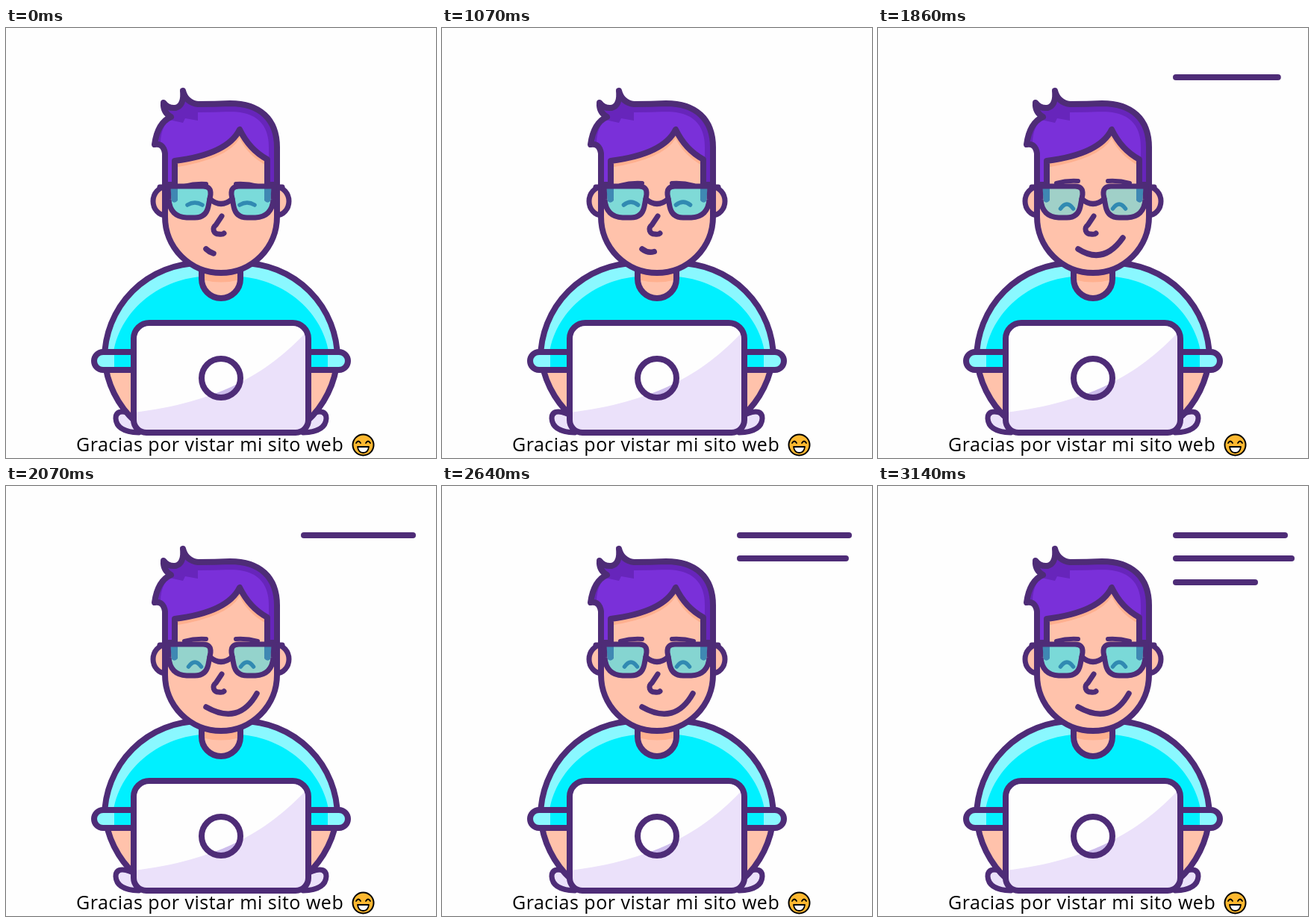
An HTML page with a canvas for the animation above (3570 ms loop, 576 px wide and 576 px high).

```html
<!DOCTYPE html>
<html lang="es">
<head>
<meta charset="utf-8">
<style>
html, body { margin: 0; width: 100%; height: 100%; overflow: hidden; background: #fefefe; }
canvas { display: block; width: 576px; height: 576px; }
</style>
</head>
<body>
<canvas id="stage" width="576" height="576"></canvas>
<script>
const ctx = document.getElementById('stage').getContext('2d');
const LOOP = 3570, STEP = 71.4;
const INK = '#4e2c77', SKIN = '#ffc2ab', SHADE = '#ffb08f', HAIR = '#7a30d9', HAIR_DARK = '#6725bb';
const CYAN = '#00f0ff', PALE = '#8af8ff', LILAC = '#ebe1fa', EYE = '#318ab2';

const clamp = v => Math.max(0, Math.min(1, v));
const mix = (a, b, k) => a + (b - a) * k;

// Interpolates rows of [tick, ...values].
function keyed(tick, rows) {
  let i = 0;
  while (i < rows.length - 2 && tick > rows[i + 1][0]) i++;
  const [a, b] = [rows[i], rows[i + 1]];
  const k = clamp((tick - a[0]) / (b[0] - a[0]));
  return a.slice(1).map((v, j) => mix(v, b[j + 1], k));
}

function shape(d, fill, stroke, width = 8) {
  const path = typeof d === 'string' ? new Path2D(d) : d;
  if (fill) { ctx.fillStyle = fill; ctx.fill(path); }
  if (stroke) { ctx.strokeStyle = stroke; ctx.lineWidth = width; ctx.stroke(path); }
}

function disc(x, y, r, fill, stroke, width) {
  const p = new Path2D();
  p.arc(x, y, r, 0, Math.PI * 2);
  shape(p, fill, stroke, width);
}

function clipped(path, draw) {
  ctx.save();
  ctx.clip(path);
  draw();
  ctx.restore();
}

function bothSides(draw) {
  draw();
  ctx.save();
  ctx.transform(-1, 0, 0, 1, 576, 0);
  draw();
  ctx.restore();
}

const ROWS = [66, 97, 129];
const FADE = [null, '#c9c9cd', '#89809a', INK];

function bar(y, right, color) {
  if (right > 396) shape(`M399 ${y} H${Math.max(399.1, right - 4)}`, null, color);
}

function drawLines(tick, ms) {
  const level = keyed(tick, [[0, 0], [3, 3], [4, 3], [7, 0], [8, 0], [11, 3], [12, 3], [15, 0]])[0];
  const color = FADE[Math.round(level)];
  if (color) [434, 411, 415].forEach((right, i) => bar(ROWS[i], right, color));
  const typed = [[1330, 0.275, 549], [2147, 0.303, 558], [2760, 0.3, 509]];
  typed.forEach(([start, speed, end], i) =>
    bar(ROWS[i], Math.min(end, 395 + Math.max(0, ms - start) * speed), INK));
}

function drawBody(tick) {
  const phase = clamp((tick - 13) / 31) * 9;
  const lift = -4 * (1 - Math.cos(phase * Math.PI * 2));
  bothSides(() => {
    shape('M178 542 Q148 541 147 523 Q147 514 156 514 Q164 514 178 522', LILAC, INK, 7);
    ctx.save();
    ctx.translate(0, lift);
    const arm = 'M132 443 A128 128 0 0 0 174 528';
    shape(arm + ' H200 V443 Z', SKIN);
    shape(arm, null, INK);
    ctx.restore();
  });
  const shirt = 'M132 443 A128 128 0 0 1 260 315 H316 A128 128 0 0 1 444 443';
  shape(shirt, PALE);
  shape('M143 440 C150 380 204 337 262 333 H314 C372 337 426 380 433 440 Z', CYAN);
  shape(shirt, null, INK);
  bothSides(() => {
    const cuff = new Path2D();
    cuff.roundRect(118, 434, 70, 24, 12);
    shape(cuff, PALE);
    shape('M145 434 H188 V458 H145 Z', CYAN);
    shape(cuff, null, INK);
  });
  const neck = 'M262 320 V336 A26 26 0 0 0 314 336 V320';
  shape(neck, SKIN);
  shape('M262 320 H314 V337 Q288 344 262 337 Z', SHADE);
  shape(neck, null, INK);
}

function drawHair() {
  const crown = new Path2D('M213 210 V168 Q211 154 199 156 Q203 127 221 119 Q210 113 211 100 ' +
    'Q217 108 227 107 Q239 104 237 84 Q241 100 257 102 Q280 102 300 101 C340 101 363 122 363 160 ' +
    'V210 H350 V176 Q326 163 313 136 Q297 169 226 178 V210 Z');
  shape(crown, HAIR);
  clipped(crown, () => {
    shape('M257 102 Q280 102 300 101 C340 101 363 122 363 160 V210', null, HAIR_DARK, 22);
    shape('M200 95 H257 V124 L240 121 L237 127 L219 123 Q208 132 207 153 H195 Z', HAIR_DARK);
  });
  shape(crown, null, INK);
}

function drawHead(tick, ms) {
  bothSides(() => shape('M214 213 A17 19 0 0 0 214 251', SKIN, INK, 7));
  const face = 'M213 165 V253 A75 75 0 0 0 363 253 V165';
  shape(face + ' L313 130 Z', SKIN);
  shape('M225 178 Q297 167 313 136 Q326 164 350 176 V185 Q324 171 313 148 Q296 176 225 187 Z', SHADE);
  shape(face, null, INK);
  drawHair();

  const wake = clamp((ms - 930) / 500);
  bothSides(() => {
    const y = mix(4, 0, wake);
    shape(`M239 ${208 + y} Q253 ${204 + y} 268 ${205 + y}`, null, INK, 6);
  });

  const tint = keyed(tick, [[13, 122, 219, 218], [21, 143, 213, 204], [26, 160, 208, 200],
    [32, 135, 213, 208], [37, 133, 213, 209], [44, 122, 217, 216]]);
  const lens = 'M217 212 H264 Q275 212 274 223 L271 239 Q268 254 253 254 H242 Q220 253 218 230 Z';
  const drop = keyed(tick, [[20, 0], [26, 5]])[0];
  const arch = mix(231, 225, wake) + drop;
  bothSides(() => {
    shape('M206 213 H216', null, INK, 7);
    shape(lens, `rgb(${tint.map(Math.round)})`);
    shape('M220 214 H230 V231 Q226 236 222 232 Z', '#3f88b3');
    const spread = mix(10, 8.5, wake);
    shape(`M${253 - spread} ${237 + drop} Q253 ${arch} ${253 + spread} ${237 + drop}`, null, EYE, 5.5);
    shape(lens, null, INK, 7);
  });
  shape('M273 229 Q288 242 303 229', null, INK, 7);
  shape('M289 252 L281 264 A6.5 6.5 0 0 0 285 276 Q290 277 292 275', null, INK, 7);

  const [cx, cy, x, y] = keyed(tick, [[13, 272, 300, 278, 302], [21, 286, 308, 303, 292],
    [26, 302, 318, 328, 281], [29, 312, 321, 336, 278]]);
  shape(`M268 296 Q${cx} ${cy} ${x} ${y}`, null, INK, 7.5);
}

function drawLaptop() {
  const lid = new Path2D(), badge = new Path2D();
  lid.roundRect(171, 395, 234, 147, [21, 21, 17, 17]);
  badge.arc(288, 469, 26, 0, Math.PI * 2);
  const glow = new Path2D('M171 515 C280 502 350 465 405 404 V542 H171 Z');
  shape(lid, '#fefefe');
  clipped(lid, () => shape(glow, LILAC));
  shape(lid, null, INK);
  shape(badge, '#fefefe');
  clipped(badge, () => shape(glow, '#cdbdec'));
  shape(badge, null, INK);
}

function drawCaption() {
  ctx.fillStyle = '#000';
  ctx.font = '25px "Open Sans", "Noto Sans", sans-serif';
  ctx.letterSpacing = '0.5px';
  ctx.fillText('Gracias por vistar mi sito web', 94, 567);
  disc(478.5, 558.5, 14, '#fdb830', '#000', 2);
  shape('M471 561 H486 Q485 569 478.5 569 Q472 569 471 561 Z', '#fff', '#000', 1.8);
  shape('M469 556 Q472 551 475 556 M482 556 Q485 551 488 556', null, '#000', 1.8);
}

function render(now) {
  const tick = Math.min(49, Math.floor((now % LOOP + 5) / STEP));
  ctx.fillStyle = '#fefefe';
  ctx.fillRect(0, 0, 576, 576);
  ctx.lineCap = ctx.lineJoin = 'round';
  const held = Math.min(44, tick);
  drawLines(held, held * STEP);
  drawBody(held);
  drawHead(held, held * STEP);
  drawLaptop();
  drawCaption();
}

let start;
function loop(now) {
  start ??= now;
  render(now - start);
  requestAnimationFrame(loop);
}
render(0);
requestAnimationFrame(loop);
</script>
</body>
</html>
```
